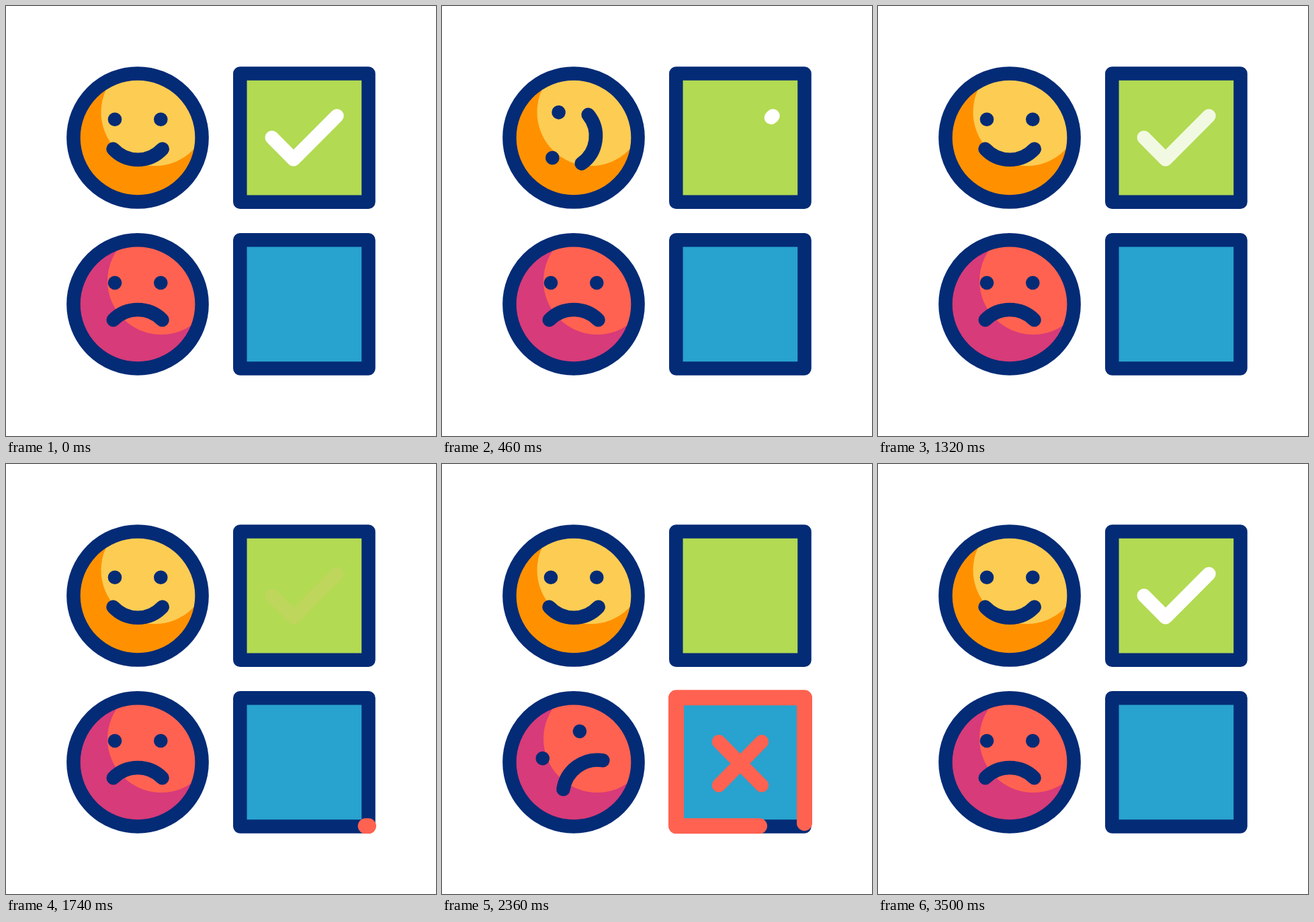
Recreate the animation shown at these times as an HTML page. Size 640 by 640 pixels, loop 3600 ms.

```html
<!DOCTYPE html>
<html lang="en">
<head>
<meta charset="utf-8">
<title>Feedback checkboxes</title>
<style>
  html, body { margin: 0; width: 100%; height: 100%; overflow: hidden; background: #fff; }
  svg { display: block; width: 100%; height: 100%; }
  .line { fill: none; stroke-width: 20.5; stroke-linecap: round; stroke-linejoin: round; }
  .navy { stroke: #042b76; }
  .coral { stroke: #ff6251; }
  .eye { fill: #042b76; }
</style>
</head>
<body>
<svg viewBox="0 0 640 640">
  <defs>
    <clipPath id="happyClip"><circle cx="196" cy="196" r="90"/></clipPath>
    <clipPath id="sadClip"><circle cx="196" cy="443.8" r="90"/></clipPath>
  </defs>

  <circle cx="196" cy="196" r="90" fill="#ff9100"/>
  <circle cx="221.5" cy="158" r="80" fill="#fdcc53" clip-path="url(#happyClip)"/>
  <circle class="line navy" cx="196" cy="196" r="95.6"/>
  <g id="happy">
    <circle class="eye" cx="162" cy="168.7" r="10.3"/>
    <circle class="eye" cx="230.3" cy="168.7" r="10.3"/>
    <path class="line navy" d="M159.5 212.8A50 50 0 0 0 232.8 212.8"/>
  </g>

  <circle cx="196" cy="443.8" r="90" fill="#d73b79"/>
  <circle cx="231" cy="409" r="80" fill="#ff6251" clip-path="url(#sadClip)"/>
  <circle class="line navy" cx="196" cy="443.8" r="95.6"/>
  <g id="sad">
    <circle class="eye" cx="162" cy="412" r="10.3"/>
    <circle class="eye" cx="230.3" cy="412" r="10.3"/>
    <path class="line navy" d="M159.7 467.2A51.5 51.5 0 0 1 232.6 467.2"/>
  </g>

  <rect class="line navy" x="348.3" y="100.5" width="191.2" height="191.2" style="fill:#b2da52"/>
  <path id="check" class="line" d="M395.8 195.8L428 228.2L492.5 163.5" pathLength="1"/>

  <rect class="line navy" x="348.3" y="348.2" width="191.2" height="191.2" style="fill:#28a2ce"/>
  <path id="border" class="line coral" style="stroke-width:23" pathLength="1"
        d="M539.5 538.8H348.5V347.8H539.5V538.8"/>
  <g id="cross">
    <path id="fall" class="line coral" d="M411.9 413.3L475.9 478.3" pathLength="1"/>
    <path id="rise" class="line coral" d="M411.9 478.3L475.9 413.3" pathLength="1"/>
  </g>
</svg>
<script>
const LOOP = 3600, STEP = 20;
const el = id => document.getElementById(id);
const [happy, sad, check, border, cross, fall, rise] =
  ['happy', 'sad', 'check', 'border', 'cross', 'fall', 'rise'].map(el);

const linear = (t, from, to) => Math.min(1, Math.max(0, (t - from) / (to - from)));
const ease = (t, from, to) => {
  const x = linear(t, from, to);
  return x * x * (3 - 2 * x);
};

// Show only the part of a path between two fractions of its length.
function trim(path, from, to) {
  const length = to - from;
  path.style.visibility = length > 0.001 ? 'visible' : 'hidden';
  path.setAttribute('stroke-dasharray', length > 0.999 ? 'none' : `${length} 3`);
  path.setAttribute('stroke-dashoffset', -from);
}

function growFromMiddle(path, amount) {
  trim(path, 0.5 - amount / 2, 0.5 + amount / 2);
}

// One full turn that overshoots by 15 degrees and settles back.
function spin(group, t, cy) {
  const angle = 375 * ease(t, 0, 690) - 15 * ease(t, 690, 860);
  group.setAttribute('transform', `rotate(${angle} 196 ${cy})`);
}

function drawCheck(t) {
  if (t < 510) trim(check, ease(t, 0, 510), 1);
  else trim(check, 0, ease(t, 510, 715));
  const faded = t >= 1400 && t < 3290;
  check.style.stroke = faded ? '#ffc090' : '#fff';
  check.style.opacity = t < 1400 ? 1 - 0.84 * linear(t, 1300, 1400)
    : t < 1750 ? 0.16
    : linear(t, 3290, 3490);
}

function render(t) {
  spin(happy, t, 196);
  spin(sad, t - 1830, 443.8);
  drawCheck(t);
  trim(border, ease(t, 2236, 2916), ease(t, 1710, 2390));
  growFromMiddle(fall, ease(t, 1840, 2030));
  growFromMiddle(rise, ease(t, 1930, 2120));
  cross.style.opacity = 1 - linear(t, 3290, 3490);
}

const start = performance.now();
function tick() {
  const t = (performance.now() - start) % LOOP;
  render(Math.floor(t / STEP) * STEP);
  requestAnimationFrame(tick);
}
render(0);
requestAnimationFrame(tick);
</script>
</body>
</html>
```
